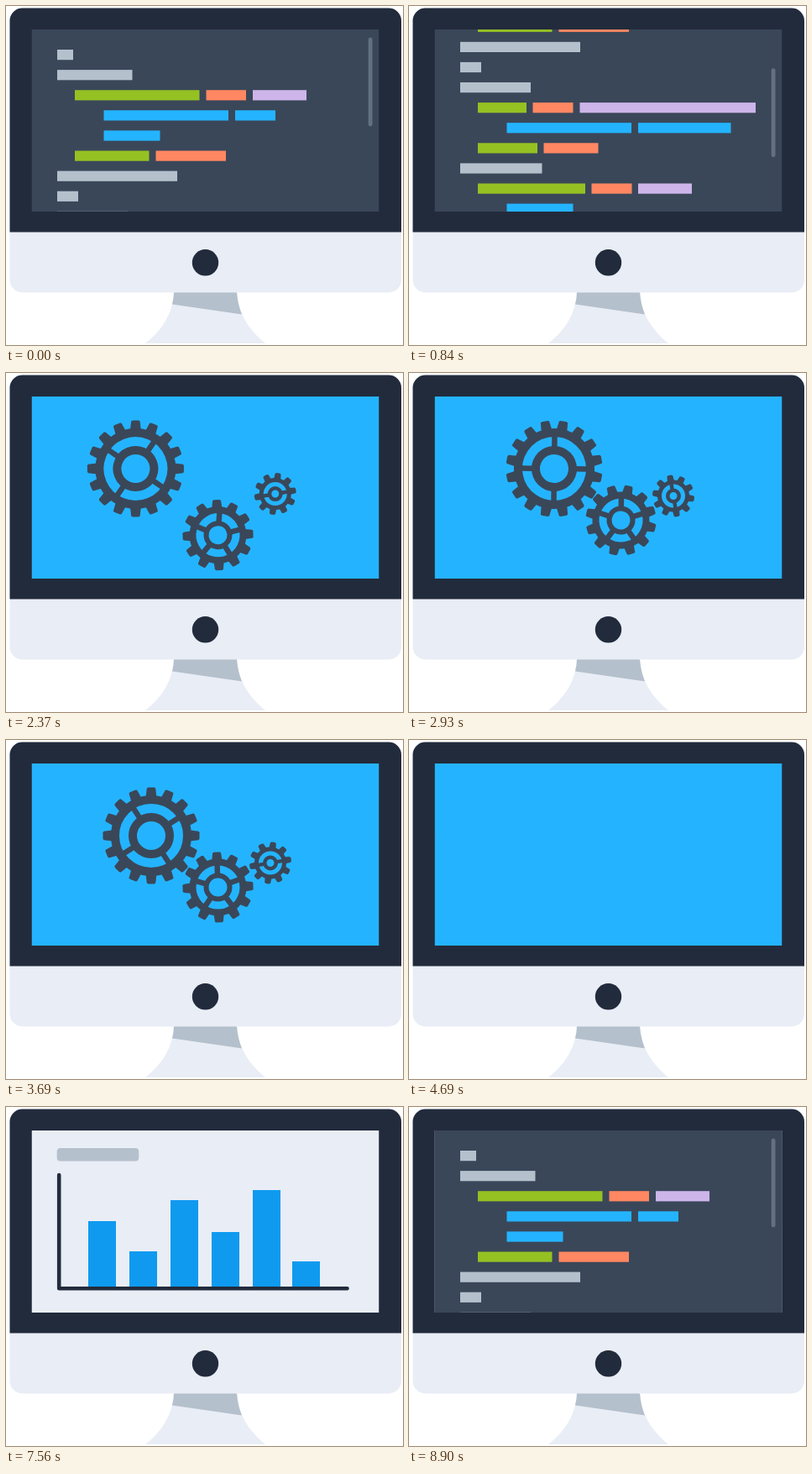
An HTML page with a canvas that plays this animation: 473x404 px, repeating every 8970 ms.

```html
<!DOCTYPE html>
<html lang="en">
<head>
<meta charset="utf-8">
<title>Code, gears and chart on a desktop screen</title>
<style>
html, body { margin: 0; width: 473px; height: 404px; overflow: hidden; background: #fff; }
canvas { display: block; }
</style>
</head>
<body>
<canvas id="stage" width="473" height="404"></canvas>
<script>
const ctx = document.getElementById('stage').getContext('2d');
const LOOP = 8970, STEP = 70;
const SCREEN = [30.5, 28, 414, 217];

const INK = '#222b3c', SLATE = '#3a4759', LIGHT = '#e9edf5', SKY = '#24b4ff', BAR = '#0f9af0', GREY = '#b4c0cc';
const TINT = { w: GREY, g: '#95c123', o: '#ff8762', p: '#cdb5ea', b: SKY };

// Runs of picture changes: start time in ms, number of steps
const RUNS = [[70, 18], [1430, 5], [1880, 19], [3310, 4], [3690, 3], [4000, 1], [4170, 1],
  [4340, 6], [4860, 3], [5170, 4], [5550, 1], [5720, 9], [8620, 5]];

// Code lines: colour, left, right
const CODE = [
  ['w', 61, 80], ['w', 61, 150.5],
  ['g', 82, 230.5, 'o', 238.5, 286, 'p', 294, 358],
  ['b', 116.5, 265, 'b', 273, 321], ['b', 116.5, 183.5],
  ['g', 82, 170.5, 'o', 178.5, 262], ['w', 61, 204], ['w', 61, 86],
  ['w', 61, 145],
  ['g', 82, 140, 'o', 147.5, 195.5, 'p', 203.5, 413],
  ['b', 116.5, 265, 'b', 273, 383.5],
  ['g', 82, 153, 'o', 160.5, 225.5], ['w', 61, 158.5],
  ['g', 82, 210, 'o', 217.5, 265.5, 'p', 273, 337],
  ['b', 116.5, 195.5], ['g', 82, 170.5, 'o', 178.5, 262],
  ['w', 61, 158.5], ['w', 61, 86]
];

// from: offset of the resting place when off screen; slide: steps to arrive
const GEARS = [
  { x: 173, y: 114, from: [-200, 0], slide: 12.8, teeth: 16, spokes: 4, out: 57.5, root: 48,
    rim: 38, hub: 27, hole: 17, arm: 6.5, turn: 1, tooth0: -90, spoke0: 57 },
  { x: 252.5, y: 175.5, from: [0, 190], slide: 12.8, teeth: 12, spokes: 5, out: 42, root: 34,
    rim: 26, hub: 17, hole: 11, arm: 6.5, turn: -16 / 12, tooth0: -92, spoke0: -92 },
  { x: 315, y: 146.5, from: [165, -70], slide: 10.4, teeth: 10, spokes: 2, out: 25, root: 19,
    rim: 14, hub: 9, hole: 4.5, arm: 4.5, turn: 1.6, tooth0: -82, spoke0: -10 }
];

const BARS = [[98, 136], [147, 172], [196, 111], [245, 149], [294, 99], [341, 184]];

const clamp = u => Math.min(1, Math.max(0, u));
const span = (n, start, length) => clamp((n - start) / length);
const easeOut = u => 1 - (1 - u) ** 3;
const easeInOut = u => (1 - Math.cos(Math.PI * u)) / 2;
const rad = deg => deg * Math.PI / 180;

function stepAt(ms) {
  let n = 0;
  for (const [start, count] of RUNS) {
    if (ms < start) break;
    n += Math.min(count, Math.floor((ms - start) / STEP) + 1);
  }
  return n;
}

function rect(color, x, y, w, h) {
  ctx.fillStyle = color;
  ctx.fillRect(x, y, w, h);
}

function round(color, x, y, w, h, r) {
  ctx.fillStyle = color;
  ctx.beginPath();
  ctx.roundRect(x, y, w, h, r);
  ctx.fill();
}

function shape(color, path) {
  ctx.fillStyle = color;
  ctx.fill(new Path2D(path));
}

function ring(outer, inner) {
  ctx.lineWidth = outer - inner;
  ctx.beginPath();
  ctx.arc(0, 0, (outer + inner) / 2, 0, 2 * Math.PI);
  ctx.stroke();
}

function drawMonitor() {
  rect('#fff', 0, 0, 473, 404);
  shape(LIGHT, 'M200 341H275C276 365 289 386 309 402H166C187 386 199 365 200 341Z');
  shape(GREY, 'M200 341H275Q276 355 281 367.5L198 355.5Q200 348 200 341Z');
  round(LIGHT, 4.5, 2.5, 466.5, 339, 15);
  round(INK, 4.5, 2.5, 466.5, 267, [15, 15, 0, 0]);
  ctx.beginPath();
  ctx.arc(237.5, 305.8, 15.7, 0, 2 * Math.PI);
  ctx.fill();
}

function drawCode(n) {
  rect(SLATE, ...SCREEN);
  const p = n < 75 ? easeInOut(span(n, 0, 20)) : 0;
  CODE.forEach((line, i) => {
    const y = 52 + 24.1 * i - 235 * p;
    for (let k = 0; k < line.length; k += 3)
      rect(TINT[line[k]], line[k + 1], y, line[k + 2] - line[k + 1], 12.2);
  });
  round('#637082', 431.7, 37.5 + 56 * p, 4.8, 106, 2.4);
}

function drawGear(g, n) {
  const away = 1 - easeOut(span(n, 24, g.slide)) + span(n, 51, 6) ** 2;
  const turn = (n - 47) * 112.5 / 16 * g.turn;
  ctx.save();
  ctx.translate(g.x + g.from[0] * away, g.y + g.from[1] * away);
  ctx.rotate(rad(turn));
  ctx.strokeStyle = ctx.fillStyle = SLATE;
  ring(g.root, g.rim);
  ring(g.hub, g.hole);
  ctx.lineWidth = g.arm;
  ctx.beginPath();
  for (let i = 0; i < g.spokes; i++) {
    const a = rad(g.spoke0 + 360 * i / g.spokes), c = Math.cos(a), s = Math.sin(a);
    ctx.moveTo(c * (g.hub - 1), s * (g.hub - 1));
    ctx.lineTo(c * (g.rim + 1), s * (g.rim + 1));
  }
  ctx.stroke();
  const pitch = 2 * Math.PI * g.root / g.teeth, base = pitch * .34, tip = pitch * .25;
  for (let i = 0; i < g.teeth; i++) {
    ctx.save();
    ctx.rotate(rad(g.tooth0 + 360 * i / g.teeth));
    ctx.beginPath();
    ctx.moveTo(g.root - 2, -base);
    ctx.lineTo(g.out - 1, -tip - .5);
    ctx.lineTo(g.out, -tip + 1);
    ctx.lineTo(g.out, tip - 1);
    ctx.lineTo(g.out - 1, tip + .5);
    ctx.lineTo(g.root - 2, base);
    ctx.fill();
    ctx.restore();
  }
  ctx.restore();
}

function drawGears(n) {
  rect(SKY, ...SCREEN);
  for (const g of GEARS) drawGear(g, n);
}

function drawChart(n) {
  rect(LIGHT, ...SCREEN);
  BARS.forEach(([x, top], i) => {
    const h = (215 - top) * easeOut(span(n, 57.6 + 1.5 * i, 6));
    rect(BAR, x, 215 - h, 33, h);
  });
  ctx.strokeStyle = INK;
  ctx.lineWidth = 4.6;
  ctx.lineCap = ctx.lineJoin = 'round';
  ctx.stroke(new Path2D('M63.2 81V216.3H406.5'));
  ctx.lineCap = 'butt';
  const w = 97.5 * easeOut(span(n, 66, 7));
  if (w > 0) round(GREY, 60.7, 49, w, 15.5, 4);
}

function fade(alpha, draw, n) {
  if (alpha <= 0) return;
  ctx.globalAlpha = alpha;
  draw(n);
  ctx.globalAlpha = 1;
}

function render(ms) {
  const n = stepAt(ms);
  drawMonitor();
  ctx.save();
  ctx.beginPath();
  ctx.rect(...SCREEN);
  ctx.clip();
  if (n < 26) drawCode(n);
  if (n < 60) fade(span(n, 23, 3), drawGears, n);
  fade(span(n, 57, 3), drawChart, n);
  fade(span(n, 74, 5), drawCode, n);
  ctx.restore();
}

const began = performance.now();
function tick() {
  render((performance.now() - began) % LOOP);
  requestAnimationFrame(tick);
}
tick();
</script>
</body>
</html>
```
